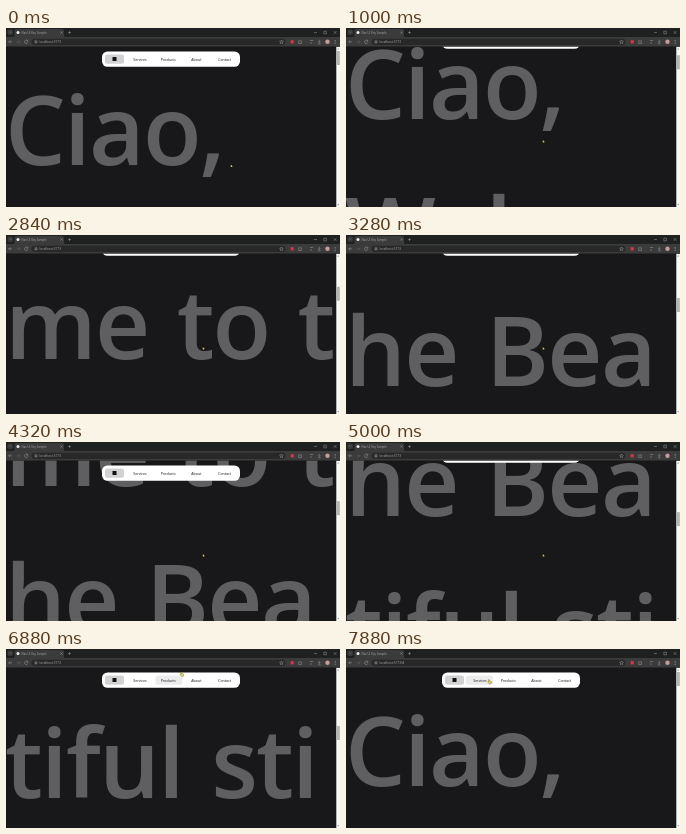
Animation of 334x179 px, one loop 8 s. Source, as an HTML page:

```html
<!DOCTYPE html>
<html lang="en">
<head>
<meta charset="utf-8">
<title>Scrolling headline</title>
<style>
  html, body { margin: 0; width: 100%; height: 100%; overflow: hidden; background: #18181a; }
  svg { display: block; width: 334px; height: 179px; font-family: "Open Sans", "Noto Sans", sans-serif; }
  #words { font-size: 96px; font-weight: 600; letter-spacing: -1.8px; word-spacing: 5px; fill: #5f5f61; }
  #menu { font-size: 3.6px; font-weight: 500; text-anchor: middle; fill: #111; }
  .ui { font-size: 3.2px; fill: #a8a8a8; }
  .icon { fill: none; stroke: #b0b0b0; stroke-width: .42; }
</style>
</head>
<body>
<svg viewBox="0 0 334 179">
  <defs><clipPath id="view"><rect y="18.5" width="334" height="161"/></clipPath></defs>
  <rect width="334" height="179" fill="#18181a"/>

  <g clip-path="url(#view)">
    <g id="words"></g>
    <g id="nav">
      <rect x="96" y="23.5" width="138" height="15.3" rx="5.5" fill="#fff"/>
      <rect x="99" y="26.5" width="19" height="9.3" rx="2.2" fill="#d2d2d4"/>
      <rect x="106.5" y="29" width="4" height="4" fill="#111"/>
      <rect id="hover" y="26.5" width="27" height="9.3" rx="2.2" fill="#ececee"/>
      <g id="menu"></g>
    </g>
    <rect x="330.3" y="18.5" width="3.7" height="161" fill="#f8f8f8"/>
    <path d="M331.2 21.6l1-1.4 1 1.4zM331.2 176.2l1 1.4 1-1.4z" fill="#888"/>
    <rect id="thumb" x="330.5" width="3.3" height="14" fill="#b4b4b4"/>
  </g>

  <g id="browser">
    <rect width="334" height="9" fill="#1f2020"/>
    <rect y="9" width="334" height="9.5" fill="#3b3b3b"/>
    <path d="M7 9q1.5 0 1.5-1.5V3q0-2 2-2H56q2 0 2 2V7.5q0 1.5 1.5 1.5z" fill="#3b3b3b"/>
    <rect x="1.5" y="1.5" width="5.500" height="5.500" rx="1.8" fill="#38393a"/>
    <circle cx="12" cy="4.5" r="1.5" fill="#eee"/>
    <text class="ui" x="15.5" y="5.6" style="font-size:2.900px">Nav UI Key Sample</text>
    <rect x="25.5" y="10.7" width="254" height="6.3" rx="3.15" fill="#282828"/>
    <circle cx="30" cy="13.8" r="2.2" fill="#424242"/>
    <text class="ui" x="33.500" y="15">localhost:5173<tspan id="hash">/#</tspan></text>
    <path class="icon" d="M3.5 3.7l.8.8.8-.8M54.5 3.5l2 2m0-2l-2 2M62 4.5h3m-1.5-1.5v3
      M308 4.5h3M317.8 3.2h2.600v2.600h-2.600zM327.8 3.2l2.600 2.600m0-2.600l-2.600 2.600
      M6 13.8H2.7m1.5-1.5l-1.5 1.500 1.500 1.500M21.7 13a1.7 1.7 0 1 0 .1 1.4m0-2.600v1.4h-1.4
      M29 13.2h2m-2 1.3h2M292.7 12.8h2.7v2.700h-2.700zM304 12.5h3.2M304 15h2
      M313.3 11.8v2.700m-1.200-1.200l1.200 1.200 1.200-1.200M311.8 15.8h3"/>
    <path class="icon" d="M10.7 13.8H14m-1.5-1.5l1.5 1.5-1.5 1.5" style="stroke:#6a6a6a"/>
    <path class="icon" d="M275.5 12l.6 1.2 1.3.2-1 .9.3 1.3-1.2-.7-1.2.7.3-1.3-1-.9 1.3-.2z"/>
    <rect x="284.7" y="12.2" width="3" height="3.2" fill="#d9363e"/>
    <circle cx="321.5" cy="13.8" r="2.2" fill="#c99"/>
    <path d="M329.200 12v.8m0 .7v.8m0 .7v.8" stroke="#bbb" stroke-width=".7"/>
  </g>

  <g id="pointer" fill="#f0d84a">
    <path id="arrow" d="M.3 0V2.400H1.200L2.200 2z"/>
    <path id="hand" stroke="#3a3514" stroke-width=".3" d="M.6 0q.6 0 .6.6V1.600L2.900 2Q3.500 2.200 3.300 3L2.900 4.300H1L-.3 2.500Q-.1 1.800.2 2.300V.5Q.2 0 .6 0z"/>
  </g>
</svg>

<script>
const LOOP = 8000, STEP = 40, CLICK = 7600;
const BASELINE = 137, PITCH = 148, HIDDEN = -18, SLIDE = 240;

// Gestures: start, end, then where it comes to rest
const wheel = [[760, 1000, 46], [1080, 1240, 86], [1800, 2120, 195], [2160, 2320, 276],
  [2720, 3280, 430], [3520, 3840, 377], [4280, 4520, 448], [4840, 5200, 580]];
const drags = [[160, 560, 196.5, 112], [5720, 5920, 182, 80], [5920, 6560, 174.5, 23],
  [7080, 7400, 160.5, 28.5], [7560, 7880, 142.2, 30.5]];
// The bar hides and returns in turn
const slides = [760, 3520, 4320, 6600].map((start, i) => [start, start + SLIDE, i % 2 ? 0 : HIDDEN]);

const linear = k => k;
const smooth = k => k * k * (3 - 2 * k);

function glide(gestures, rest, t, ease) {
  return gestures.reduce((pos, [start, end, ...goal]) => {
    const k = ease(Math.min(1, Math.max(0, (t - start) / (end - start))));
    return pos.map((v, i) => v + (goal[i] - v) * k);
  }, rest);
}

const el = id => document.getElementById(id);
const move = (id, x, y) => el(id).setAttribute("transform", `translate(${x} ${y})`);
const show = (id, on) => el(id).setAttribute("visibility", on ? "visible" : "hidden");

function addText(parent, text, x, y) {
  const node = document.createElementNS("http://www.w3.org/2000/svg", "text");
  node.textContent = text;
  node.setAttribute("x", x);
  node.setAttribute("y", y);
  el(parent).append(node);
}

["Ciao,", "Welco", "me to t", "he Bea", "tiful sti"].forEach((line, i) =>
  addText("words", line, -1, BASELINE + i * PITCH));
["Services", "Products", "About", "Contact"].forEach((label, i) =>
  addText("menu", label, 134 + i * 28.2, 32.6));

function draw(now) {
  const t = Math.floor(now % LOOP / STEP) * STEP;
  const top = t < CLICK ? glide(wheel, [0], t, linear)[0] : 0;
  const [x, y] = glide(drags, [224.5, 136.5], t, smooth);
  move("words", 0, -top);
  move("nav", 0, glide(slides, [0], t, smooth)[0]);
  el("thumb").setAttribute("y", 23 + top / 10.75);
  move("pointer", x, y);

  const onLink = t > 6720;
  el("hover").setAttribute("x", x < 149 ? 120 : 149.5);
  show("hover", onLink);
  show("hand", onLink);
  show("arrow", !onLink);
  show("hash", t >= CLICK);
  requestAnimationFrame(draw);
}
requestAnimationFrame(draw);
</script>
</body>
</html>
```
